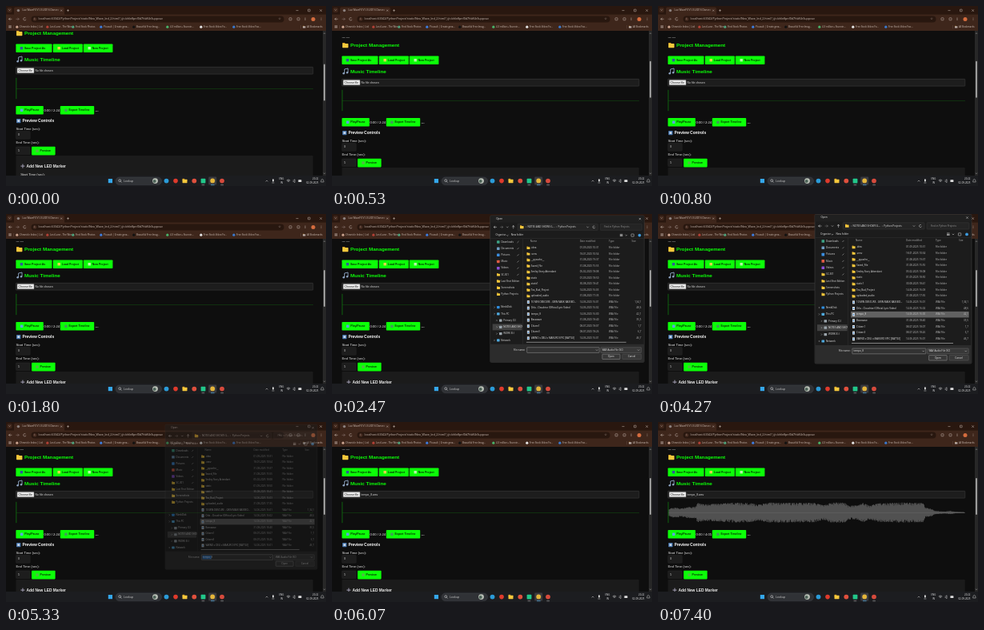
Animation, 400 px wide and 225 px high, one loop 7470 ms. Source, as an HTML page with a canvas:

```html
<!DOCTYPE html>
<html lang="en">
<head>
<meta charset="utf-8">
<title>Timeline editor</title>
<style>
html, body { margin: 0; width: 100%; height: 100%; overflow: hidden; background: #0e0e0e; }
canvas { display: block; width: 400px; height: 225px; }
</style>
</head>
<body>
<canvas id="stage"></canvas>
<script>
const LOOP = 7470;
const UI = '"Open Sans", "Noto Sans", sans-serif';
const PAGE = '"Liberation Sans", Arial, sans-serif';
const LIME = '#0cff08';
const canvas = document.getElementById('stage');
const ctx = canvas.getContext('2d');
const dpr = window.devicePixelRatio || 1;
canvas.width = 400 * dpr;
canvas.height = 225 * dpr;

const clamp = v => Math.max(0, Math.min(1, v));
const easeOut = p => 1 - (1 - clamp(p)) ** 3;

function rect(x, y, w, h, fill) {
  ctx.fillStyle = fill;
  ctx.fillRect(x, y, w, h);
}
function round(x, y, w, h, r, fill, stroke) {
  ctx.beginPath();
  ctx.roundRect(x, y, w, h, r);
  if (fill) { ctx.fillStyle = fill; ctx.fill(); }
  if (stroke) { ctx.strokeStyle = stroke; ctx.lineWidth = 0.5; ctx.stroke(); }
}
function dot(x, y, r, fill) {
  ctx.beginPath();
  ctx.arc(x, y, r, 0, 7);
  ctx.fillStyle = fill;
  ctx.fill();
}
function arc(x, y, r, from, to, color) {
  ctx.beginPath();
  ctx.arc(x, y, r, from, to);
  ctx.strokeStyle = color;
  ctx.lineWidth = 0.5;
  ctx.stroke();
}
function path(points, color, width = 0.5) {
  ctx.beginPath();
  points.forEach(([x, y]) => ctx.lineTo(x, y));
  ctx.strokeStyle = color;
  ctx.lineWidth = width;
  ctx.stroke();
}
function text(str, x, y, size, color, family = UI, weight = 400, align = 'left') {
  ctx.font = `${weight} ${size}px ${family}`;
  ctx.textAlign = align;
  ctx.textBaseline = 'middle';
  ctx.fillStyle = color;
  ctx.fillText(str, x, y);
}
function clipped(x, y, w, h, draw) {
  ctx.save();
  ctx.beginPath();
  ctx.rect(x, y, w, h);
  ctx.clip();
  draw();
  ctx.restore();
}
function arrow(x, y, dx, dy, color) {
  path([[x - dx * 2, y - dy * 2], [x + dx * 2, y + dy * 2]], color);
  path([[x + dy * 1.4, y + dx * 1.4], [x + dx * 2, y + dy * 2], [x - dy * 1.4, y - dx * 1.4]], color);
}
function cross(x, y, r, color) {
  path([[x - r, y - r], [x + r, y + r]], color);
  path([[x + r, y - r], [x - r, y + r]], color);
}
function chevron(x, y, color) {
  path([[x - 1.2, y - 0.6], [x, y + 0.6], [x + 1.2, y - 0.6]], color);
}
function folder(x, y, w, h, color = '#f5c83c') {
  rect(x, y, w * 0.45, h * 0.3, '#d99f22');
  round(x, y + h * 0.18, w, h * 0.82, w * 0.08, color);
}

// Waveform: envelope through a few points, roughened by seeded noise
const ENVELOPE = [[13, 4], [18, 6], [25, 6], [28, 5], [38, 7], [47, 7], [49, 12], [58, 10.5],
  [75, 11], [95, 12.5], [115, 12], [125, 10], [140, 12.5], [195, 12], [207, 9], [216, 12.5],
  [233, 12.5], [238, 8.5], [250, 9], [256, 12], [264, 8.5], [275, 11.5], [305, 12.5], [332, 12],
  [334, 6], [342, 4.5], [346, 2], [358, 1.3], [366, 2], [371, 1], [384, 0.5]];
function envelope(x) {
  const i = Math.max(1, ENVELOPE.findIndex(p => p[0] >= x));
  const [x0, a0] = ENVELOPE[i - 1], [x1, a1] = ENVELOPE[i];
  return a0 + (a1 - a0) * (x - x0) / (x1 - x0);
}
function noise(n) {
  const v = Math.sin(n * 127.1 + 3.7) * 43758.5453;
  return v - Math.floor(v);
}
function waveform() {
  for (let x = 13.5; x < 383; x += 0.5) {
    const a = envelope(x);
    const up = a * (1 - 0.3 * noise(x) ** 2), down = a * (1 - 0.3 * noise(x + 500) ** 2);
    rect(x, 113.2 - up, 0.5, up + down, '#696969');
  }
}

function button(label, x, y, w, textX, icon) {
  round(x, y, w, 10.6, 0.8, LIME);
  rect(textX - 5.3, y + 3.6, 3.4, 3.4, icon);
  text(label, textX, y + 5.5, 3.47, '#062806', PAGE, 700);
}
function field(value, y) {
  round(12.4, y, 17.8, 9.6, 0.8, '#1d1d1d', '#282828');
  text(value, 15, y + 4.9, 3.47, '#ddd', PAGE);
}

function page(t) {
  const scroll = -10 + 15 * easeOut((t - 70) / 400) - 5 * easeOut((t - 900) / 400);
  const picked = t >= 5470, decoded = t >= 7000;
  rect(0, 31, 400, 182, '#0e0e0e');
  ctx.save();
  ctx.translate(0, scroll);

  text('--- ---', 12.5, 33.4, 4.17, '#ddd', PAGE, 700);
  folder(13, 41, 7.4, 6.2);
  text('Project Management', 23, 44.6, 6.25, LIME, PAGE, 700);
  button('Save Project As', 12.4, 57.4, 45, 23, '#315a9b');
  button('Load Project', 58.8, 57.4, 37, 69.8, '#e7d54a');
  button('New Project', 96.8, 57.4, 36.6, 107.8, '#b8f5a8');

  path([[15.6, 79], [15.6, 74], [20, 73], [20, 78]], '#8fa6c4', 0.9);
  dot(14.6, 79.2, 1.2, '#8fa6c4');
  dot(19, 78.2, 1.2, '#8fa6c4');
  text('Music Timeline', 23, 77.5, 6.25, LIME, PAGE, 700);

  round(12.4, 86.3, 371.4, 8.8, 0.6, '#1d1d1d', '#444');
  round(14, 87.6, 21, 6.2, 0.6, '#efefef', '#777');
  text('Choose file', 15.6, 90.8, 3.47, '#111', PAGE);
  text(picked ? 'tempo_8.wav' : 'No file chosen', 36.6, 90.8, 3.47, '#ddd', PAGE);

  rect(13, 113, 371, 0.6, decoded ? '#555' : '#12470f');
  if (decoded) waveform();
  rect(12.6, 99.8, 0.6, 26.4, '#119711');

  button('Play/Pause', 12.4, 135, 34.4, 23.2, '#5da4e8');
  text(decoded ? '0:00 / 4:05' : '0:00 / 2:24', 47.4, 140.6, 4.17, '#eee', PAGE);
  button('Export Timeline', 67.8, 135, 42.4, 78.5, '#409d58');
  text('---', 111.4, 140.6, 4.17, '#eee', PAGE, 700);

  round(13, 151, 5.4, 5.2, 0.7, '#4b78ad');
  rect(14.4, 152.4, 2.6, 2.4, '#d9e5f2');
  text('Preview Controls', 20.4, 154, 4.875, '#fff', PAGE, 700);
  text('Start Time (sec):', 12.5, 164, 4.17, '#eee', PAGE);
  field('0', 166.6);
  text('End Time (sec):', 12.5, 180.4, 4.17, '#eee', PAGE);
  field('5', 186);
  button('Preview', 32, 185.8, 29.6, 42.6, '#55b747');

  round(12.4, 197, 371.4, 60, 1.2, '#1b1b1b');
  rect(18.4, 209.5, 5, 1.2, '#918da0');
  rect(20.3, 207.6, 1.2, 5, '#918da0');
  text('Add New LED Marker', 25.6, 210.2, 4.875, '#eee', PAGE, 700);
  text('Start Time (sec):', 18.2, 220.4, 4.17, '#eee', PAGE);
  ctx.restore();

  rect(396, 31, 4, 182, '#272727');
  round(397, 70 - scroll * 0.25, 2, 46, 1, '#9c9c9c');
  path([[397, 35], [398, 33.6], [399, 35]], '#999');
  path([[397, 208.5], [398, 210], [399, 208.5]], '#999');
}

const BOOKMARKS = [
  ['Chronicle Index | Ltd', 17, '#c9a28e'], ['Lost Lane - The Wor...', 55, '#b24136'],
  ['Find Stock Photos', 87, '#4fa37d'], ['Picvault | Create grea...', 122, '#3d7de0'],
  ['Beautiful Free Imag...', 163, '#111'], ['4.3 million+ Stunnin...', 205, '#48b36a'],
  ['Free Stock Video Fo...', 247, '#e5e5e5'], ['Free Stock Video Foo...', 288, '#397ad0']
];
function browser() {
  const ink = '#cfc0b8', bar = '#3e261b';
  rect(0, 0, 400, 11, '#29170f');
  rect(0, 10.6, 400, 20.4, bar);
  round(1.5, 2, 6, 6, 1.5, bar);
  chevron(4.5, 5, ink);
  round(10, 1.6, 63, 11, 2, bar);
  dot(15.4, 5.6, 1.7, '#8d8380');
  clipped(20, 0, 46, 11, () => text('Lux WaveFX V1.0 LED16 Dance c', 20.6, 5.6, 3.1, ink));
  cross(69.2, 5.6, 1, ink);
  path([[76, 5.6], [79, 5.6]], ink);
  path([[77.5, 4.1], [77.5, 7.1]], ink);
  path([[362.5, 5.6], [365.5, 5.6]], ink);
  round(377.5, 4.2, 2.6, 2.6, 0.2, null, ink);
  cross(393.6, 5.6, 1.3, ink);

  arrow(5.4, 16.3, -1, 0, ink);
  arrow(14.4, 16.3, 1, 0, '#8d7b77');
  arc(23.4, 16.3, 1.7, 0.3, 5.5, ink);
  round(31.5, 12.4, 316, 8, 4, '#28170f');
  dot(36, 16.4, 2.2, '#4a3025');
  text('i', 36, 16.4, 3, ink, UI, 400, 'center');
  text('localhost:63342/PythonProject/static/Neo_Wave_led_2.html?_ijt=bhle8pnf0d7hb84r3uppvuv',
    40.6, 16.4, 3.65, ink);
  text('☆', 342, 16.4, 4, ink, '"DejaVu Sans", sans-serif', 400, 'center');
  round(354, 14.8, 3, 3, 0.5, null, ink);
  round(364, 14.8, 3, 3, 0.5, null, ink);
  path([[374, 14.5], [374, 18]], ink);
  dot(384, 16.4, 2.5, '#d56c3e');
  for (let i = -1; i < 2; i++) dot(394, 16.4 + i * 1.4, 0.4, ink);

  for (let i = 0; i < 4; i++) rect(3.5 + (i % 2) * 1.8, 24.4 + (i >> 1) * 1.8, 1.2, 1.2, ink);
  rect(9, 24, 0.4, 4.4, '#6a514b');
  for (const [label, x, color] of BOOKMARKS) {
    dot(x - 3.2, 26.2, 1.6, color);
    text(label, x, 26.2, 2.95, ink);
  }
  rect(368, 24, 0.4, 4.4, '#6a514b');
  folder(371, 24.8, 3.4, 2.8, '#b9aca8');
  text('All Bookmarks', 376, 26.2, 2.95, ink);
}

function taskbar() {
  rect(0, 212, 400, 13, '#1c1d20');
  rect(127.8, 216, 5.2, 5.2, '#35a7ec');
  round(137, 214, 57.5, 9.6, 4.8, '#303236', '#43454a');
  arc(142.2, 218.2, 1.4, 0, 7, '#eee');
  path([[143.2, 219.2], [144.5, 220.5]], '#eee');
  text('Lookup', 147, 218.8, 3.5, '#ccc');
  dot(186.5, 218.6, 3.4, '#b9c0b6');
  dot(185.7, 219, 2, '#4d6358');
  dot(200.5, 218.6, 2.9, '#2b9bd8');
  dot(212, 218.6, 2.8, '#df3a2c');
  folder(220.5, 215.8, 6, 5.4);
  dot(235.3, 218.6, 2.9, '#e0503d');
  round(243.6, 215.7, 5.8, 5.8, 0.8, '#22c78a');
  round(253.2, 213.6, 10, 10, 1.2, '#3a3b3f');
  dot(258.2, 218.4, 2.9, '#e4b53a');
  dot(270, 218.6, 2.9, '#d64a3c');
  rect(244.6, 223.4, 3.6, 0.7, '#999');
  rect(256, 223.4, 4.6, 0.7, '#5ab4ea');
  rect(268.3, 223.4, 3.6, 0.7, '#999');

  path([[324.6, 219.4], [326, 218], [327.4, 219.4]], '#ddd');
  round(333, 216.2, 1.8, 3.4, 0.9, '#ddd');
  path([[332.4, 221], [335.4, 221]], '#ddd');
  text('ENG', 344.4, 216.4, 2.8, '#eee', UI, 400, 'center');
  text('IN', 344.4, 221, 2.8, '#eee', UI, 400, 'center');
  for (const r of [1.2, 2.3, 3.4]) arc(353, 220.5, r, -2.3, -0.84, '#ddd');
  path([[358.6, 218], [359.6, 218], [361, 216.7], [361, 220.7], [359.6, 219.5], [358.6, 219.5]], '#ddd');
  round(365.4, 217.2, 4, 2.8, 0.5, '#ddd');
  text('20:22', 390.5, 216.4, 2.9, '#eee', UI, 400, 'right');
  text('02-09-2025', 390.5, 221, 2.9, '#eee', UI, 400, 'right');
  path([[393.6, 220], [394.2, 217.2], [395.4, 216.4], [396.6, 217.2], [397.2, 220], [393.6, 220]], '#ccc');
}

const PINNED = [
  ['Downloads', '#3da385'], ['Documents', '#6f9cc0'], ['Pictures', '#3b8ee0'], ['Music', '#e05b44'],
  ['Videos', '#8c50d8'], ['SC-301'], ['Last Shot Edition'], ['Screenshots'], ['Python Projects']
];
const DRIVES = [
  ['NimbDisk', '#2f8ee0', 0], ['This PC', '#4fa9de', 0], ['Primary (C:)', '#9aa4ab', 3],
  ['NOTES AND SHOWS (D:)', '#9aa4ab', 3], ['WORK (E:)', '#9aa4ab', 3], ['Network', '#4fa9de', 0]
];
const FILES = [
  ['.idea', '01-09-2025 10:31'], ['.venv', '18-01-2025 10:54'], ['__pycache__', '31-08-2025 19:37'],
  ['Saved_File', '31-08-2025 15:55'], ['Smiley Story Attendant', '05-02-2025 18:08'],
  ['static', '01-09-2025 18:50'], ['static1', '30-08-2025 18:41'], ['Tea_Bud_Project', '14-06-2025 16:03'],
  ['uploaded_audio', '31-08-2025 17:35'],
  ['10 MIN OBSCURE - GRIN MASK BASSBO...', '14-06-2025 16:01', '1,34,1'],
  ['Orla - Cloudrise (Official Lyric Video)', '14-06-2025 16:02', '48,6'],
  ['tempo_8', '14-06-2025 16:00', '42,1'], ['Basswave', '31-08-2025 18:40', '35,5'],
  ['Citizen1', '08-07-2025 18:07', '1,7'], ['Citizen3', '08-07-2025 18:26', '6,7'],
  ['VARNO x DELI x MAKURO EPIC [BATTLE]', '14-06-2025 16:01', '46,7']
];
const PICK = 11;
const DATE_X = 310, TYPE_X = 347;

function sidebar() {
  rect(199, 138.2, 37.5, 8, '#414141');
  PINNED.forEach(([label, color], i) => {
    const y = 34 + i * 8.3;
    if (color) round(204.5, y - 1.8, 3.6, 3.6, 0.5, color);
    else folder(204.5, y - 1.8, 4, 3.6);
    text(label, 210, y, 3, '#e2e2e2');
    if (i < 6) path([[230.4, y + 1], [232.4, y - 1]], '#999', 0.7);
  });
  DRIVES.forEach(([label, color, indent], i) => {
    const x = 204.5 + indent, y = 117 + i * 8.4;
    path([[x - 3.6, y - 1], [x - 2.6, y], [x - 3.6, y + 1]], '#bbb');
    round(x, y - 1.6, 3.6, 3.2, 0.5, color);
    text(label, x + 5.4, y, 3, '#e2e2e2');
  });
}

function dialog(chosen, marked) {
  round(196, 0.4, 196, 186.6, 1.5, '#1c1c1c', '#444');
  rect(196.4, 1, 195.2, 8.5, '#202020');
  text('Open', 203.6, 4.6, 3.2, '#eee');
  cross(386.5, 4.6, 1.2, '#ddd');

  arrow(202.5, 15, -1, 0, '#ddd');
  arrow(210.5, 15, 1, 0, '#777');
  chevron(218, 15, '#ddd');
  arrow(225.5, 15, 0, -1, '#ddd');
  round(231, 10.8, 102, 8.2, 0.6, '#242424', '#3a3a3a');
  folder(234, 12.8, 4.6, 4);
  text('›  NOTES AND SHOWS (L...  ›  Python Projects', 241, 14.9, 3.1, '#e6e6e6');
  chevron(320, 15, '#ddd');
  arc(328, 15, 1.5, 0.3, 5.5, '#ddd');
  round(336, 10.8, 53, 8.2, 0.6, '#242424', '#3a3a3a');
  text('Find in Python Projects', 341, 14.9, 3, '#999');

  text('Organise', 203, 25.4, 3.1, '#e6e6e6');
  chevron(218, 25.6, '#ddd');
  text('New folder', 222.5, 25.4, 3.1, '#e6e6e6');
  for (let i = -1; i < 2; i++) rect(361, 25 + i * 1.3, 3.6, 0.6, '#ddd');
  chevron(369, 25.4, '#ddd');
  round(375.4, 23.8, 3.4, 3.2, 0.3, null, '#ddd');
  dot(386, 25.4, 1.9, '#3d9be0');
  rect(196.4, 29, 195.2, 0.4, '#363636');

  clipped(197, 30, 40, 134, sidebar);
  rect(237.6, 30, 0.4, 134, '#383838');

  text('Name', 247, 33.4, 3, '#aaa');
  text('Date modified', DATE_X, 33.4, 3, '#aaa');
  text('Type', TYPE_X, 33.4, 3, '#aaa');
  text('Size', 376, 33.4, 3, '#aaa');
  FILES.forEach(([name, date, size], i) => {
    const y = 41.4 + i * 7.66;
    if (chosen && i === PICK) rect(241, y - 3.8, 147.6, 7.6, '#616161');
    if (size) {
      rect(243, y - 2, 3, 4, '#e3e3e3');
      rect(243.7, y - 0.8, 1.6, 1.8, '#4d8ed0');
    } else folder(242.6, y - 1.8, 4, 3.6);
    clipped(240, y - 4, 68, 8, () => text(name, 248, y, 3, '#e8e8e8'));
    text(date, DATE_X, y, 3, '#c4c4c4');
    text(size ? 'WAV File' : 'File folder', TYPE_X, y, 3, '#c4c4c4');
    if (size) text(size, 388, y, 3, '#c4c4c4', UI, 400, 'right');
  });
  rect(242, 161, 127, 0.8, '#9a9a9a');

  round(196.3, 164, 195.4, 22.7, [0, 0, 1.5, 1.5], '#2c2c2c');
  text('File name:', 240.5, 171.4, 3.1, '#e6e6e6', UI, 400, 'right');
  round(242.8, 168, 92, 6.8, 0.5, '#323232', '#999');
  if (marked) rect(244, 169.2, 11.6, 4.6, '#2f78c8');
  if (chosen) text('tempo_8', 244.4, 171.4, 3.1, '#eee');
  chevron(331.7, 171.4, '#ccc');
  round(336.6, 168, 51.6, 6.8, 0.5, '#383838', '#666');
  text('WAV Audio File (SC)', 338.4, 171.4, 3, '#e6e6e6');
  chevron(384.7, 171.4, '#ccc');
  round(338.6, 176.6, 22.6, 6.4, 0.6, '#383838', '#9a9a9a');
  text('Open', 349.9, 179.8, 3.1, '#eee', UI, 400, 'center');
  round(364, 176.6, 24.2, 6.4, 0.6, '#383838', '#5c5c5c');
  text('Cancel', 376.1, 179.8, 3.1, '#eee', UI, 400, 'center');
}

// A copy of the page laid back over the dialog fades it as one piece
const backdrop = document.createElement('canvas');
backdrop.width = canvas.width;
backdrop.height = canvas.height;
const backdropCtx = backdrop.getContext('2d');

function showDialog(t) {
  const opening = clamp((t - 2400) / 160), closing = clamp((t - 5270) / 110);
  const alpha = Math.min(1, opening * 2.5) * (1 - closing);
  if (alpha <= 0) return;
  const scale = 1 - 0.1 * (1 - opening) ** 3 - 0.055 * closing;
  if (alpha < 1) backdropCtx.drawImage(canvas, 0, 0);
  ctx.save();
  ctx.translate(294, 94);
  ctx.scale(scale, scale);
  ctx.translate(-294, -94);
  dialog(t >= 4070, t >= 5200);
  ctx.restore();
  if (alpha < 1) {
    ctx.globalAlpha = 1 - alpha;
    ctx.drawImage(backdrop, 0, 0, 400, 225);
    ctx.globalAlpha = 1;
  }
}

function frame(now) {
  const t = Math.max(0, now - start) % LOOP;
  ctx.setTransform(dpr, 0, 0, dpr, 0, 0);
  page(t);
  browser();
  taskbar();
  showDialog(t);
  requestAnimationFrame(frame);
}
const start = performance.now();
frame(start);
</script>
</body>
</html>
```
